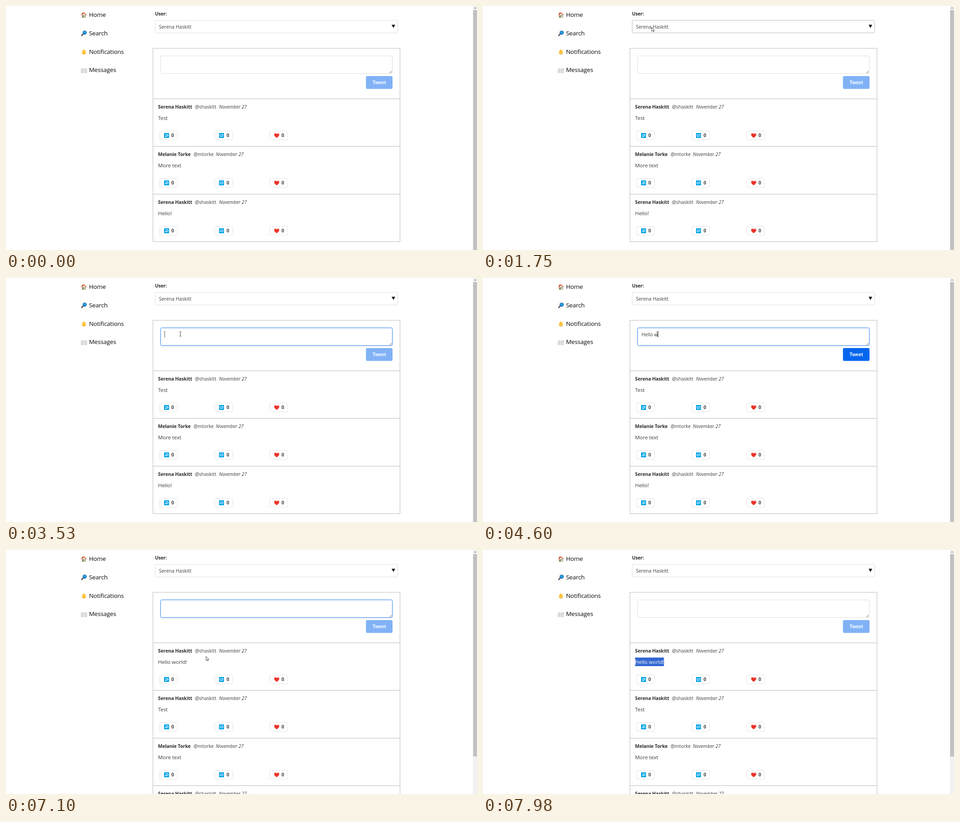
An HTML page for the animation above (8 s loop, 1037 by 540 pixels).

```html
<!DOCTYPE html>
<html lang="en">
<head>
<meta charset="utf-8">
<title>Message feed</title>
<style>
  html, body { margin: 0; width: 100%; height: 100%; overflow: hidden; background: #fff; }
  svg { display: block; width: 100vw; height: 100vh; }
  text { font: 10.4px "Open Sans", "Noto Sans", sans-serif; fill: #3d3d3d; white-space: pre; }
  .nav { font-size: 13.4px; letter-spacing: -.17px; fill: #0a0a0a; }
  .bold { font-size: 10.3px; font-weight: 700; fill: #2b2b2b; letter-spacing: -.04px; }
  .date { font-style: italic; }
  .choice { font-size: 10.6px; }
  .body { font-size: 11.5px; letter-spacing: -.06px; }
  .button { font: bold 10.7px "Liberation Sans", Arial, sans-serif; fill: #fff; }
  .count { font: bold 10.7px "Liberation Sans", Arial, sans-serif; fill: #363636; }
  .line { fill: none; stroke: #bbb; }
  .field { fill: #fff; stroke: #ddd; }
</style>
</head>
<body>
<svg id="stage" viewBox="0 0 1037 540" xmlns="http://www.w3.org/2000/svg">
  <defs>
    <g id="house">
      <path d="M2.2 2h2v4h-2z" fill="#a5422b"/>
      <path d="M2 6 6.5 2 11 6v6H2z" fill="#f1dfc4"/>
      <path d="M.3 7 6.5.8 12.7 7l-1 1-5.2-5-5.2 5z" fill="#d0502f"/>
      <path d="M3.3 7.7h2.5V12H3.3z" fill="#7a4b32"/>
      <path d="M7.3 7.7h2.4v2.2H7.3z" fill="#3a94c8"/>
      <path d="M1 11.5h11v1H1z" fill="#7d8f55"/>
    </g>
    <g id="lens">
      <path d="M1.6 11.4 5.4 7.6" stroke="#3b3f4c" stroke-width="2.4" stroke-linecap="round"/>
      <circle cx="8.2" cy="4.9" r="3.9" fill="#1b9be6" stroke="#265c8c" stroke-width="1.2"/>
      <path d="M6 4.6a2.3 2.3 0 0 1 2-2" fill="none" stroke="#8fd4fa"/>
    </g>
    <g id="bell">
      <circle cx="6.5" cy="10.8" r="1.3" fill="#d9981f"/>
      <circle cx="6.5" cy="1.6" r="1" fill="#eeb02d"/>
      <path d="M.8 10.6c1.7-1.4 1.7-3 1.9-5C2.9 3 4.4 1.5 6.5 1.5S10.1 3 10.3 5.6c.2 2 .2 3.6 1.9 5z" fill="#fdc33c"/>
    </g>
    <g id="mail">
      <path d="M.5.5h12v8.7H.5z" fill="#ececec" stroke="#bcbcbc" stroke-width=".8"/>
      <path d="M.7.8 6.5 5.6 12.3.8M.7 9 4.8 4.4M12.3 9 8.2 4.4" fill="none" stroke="#a8a8a8" stroke-width=".8"/>
    </g>
    <g id="reply">
      <rect width="11" height="11" rx="1" fill="#03a3e6"/>
      <path d="M3.2 3.2h3.4a1.9 1.9 0 0 1 0 3.8H4" fill="none" stroke="#fff" stroke-width="1.2"/>
      <path d="M2.2 7 5 4.8v4.4z" fill="#fff"/>
    </g>
    <g id="repeat">
      <rect width="11" height="11" rx="1" fill="#03a3e6"/>
      <rect x="2.2" y="3.6" width="6.6" height="3.8" rx="1" fill="none" stroke="#fff"/>
      <path d="M6.4 2.3v2.6l1.7-1.3zM4.6 6.1v2.6L2.9 7.4z" fill="#fff"/>
    </g>
    <g id="heart">
      <path d="M6 10.8C2.5 8.3.3 6.2.3 3.6.3.2 4.5-.3 6 2.5 7.5-.3 11.7.2 11.7 3.6 11.7 6.2 9.5 8.3 6 10.8z" fill="#ea3429"/>
      <path d="M8 2.3q1.5-.8 2 .9" fill="none" stroke="#ff8a80" stroke-width=".8"/>
    </g>
  </defs>
</svg>
<script>
const LOOP = 8000, SEND = 6030, FOCUS = 3530, BLUR = 7680;
const MESSAGE = "Hello world!";
const STRIKES = [3930, 4050, 4160, 4310, 4400, 4490, 4590, 4680, 4770, 4870, 5010, 5350];
const SERENA = ["Serena Haskitt", "@shaskitt", 416, 469];
const MELANIE = ["Melanie Torke", "@mtorke", 413, 462];

// Pointer keys: time, x, y
const POINTER = [
  [150, 991, 517], [420, 957, 402], [600, 971, 411], [810, 971, 411],
  [1520, 371.5, 47], [1750, 371.5, 47], [2000, 368, 58], [2430, 323.5, 43.5],
  [2550, 368, 51], [2640, 370, 52], [3100, 370, 52], [3480, 384, 124],
  [6930, 384, 124], [7100, 440.5, 235.5], [7260, 428, 253], [7600, 336, 249], [7680, 335, 248]
];

const stage = document.getElementById("stage");

function add(tag, attrs, parent = stage) {
  const el = document.createElementNS("http://www.w3.org/2000/svg", tag);
  for (const key in attrs) el.setAttribute(key, attrs[key]);
  parent.appendChild(el);
  return el;
}
function label(x, y, string, cls = "", parent = stage) {
  const el = add("text", { x, y, class: cls }, parent);
  el.textContent = string;
  return el;
}
function box(x, y, width, height, rx, attrs, parent) {
  return add("rect", { x, y, width, height, rx, ...attrs }, parent);
}
function icon(name, x, y, parent) {
  add("use", { href: "#" + name, x, y }, parent);
}
const show = (el, on) => el.setAttribute("visibility", on ? "visible" : "hidden");
const inside = (x, y, l, t, r, b) => x >= l && x <= r && y >= t && y <= b;
const slot = i => 205 + Math.round(105.4 * i);

// Navigation
[["house", "Home", 13], ["lens", "Search", 54], ["bell", "Notifications", 95.5], ["mail", "Messages", 138.5]]
  .forEach(([name, title, y], i) => {
    icon(name, 165, y);
    label(182.7, 23.7 + 40.9 * i, title, "nav");
  });

// User picker
label(328, 21, "User:", "bold");
const picker = box(328.5, 31.5, 534, 28, 3, { class: "field" });
label(336.8, 49.5, SERENA[0], "choice");
add("path", { d: "M849 41.5h8l-4 7z", fill: "#111" });

// Composer
const frame = box(323.5, 93.5, 544, 428, 0, { class: "line" });
const ring = box(339.5, 109.5, 512, 41, 4, { fill: "none", stroke: "#d3e5fb", "stroke-width": 1.5 });
const area = box(340.5, 110.5, 510, 39, 3, { class: "field" });
add("path", { d: "M844 148.5l5-5M847 148.5l2-2", stroke: "#444", "stroke-width": .8 });
const draft = label(349, 129, "");
const caret = add("path", { stroke: "#444", "stroke-width": .9 });
const send = box(792.5, 155, 58.5, 28.5, 3, {});
label(807, 173, "Tweet", "button");

// Feed
function makePost([name, handle, handleX, dateX], string) {
  const g = add("g", {});
  add("path", { d: "M323.5 .5h544", class: "line" }, g);
  label(334.8, 22, name, "bold", g);
  label(handleX, 22, handle, "", g);
  label(dateX, 22, "November 27", "date", g);
  const mark = box(334.8, 33, 0, 19, 0, { fill: "#3367d1" }, g);
  const body = label(334.8, 47, string, "body", g);
  [["reply", 338.5, 348], ["repeat", 460, 469], ["heart", 581, 590]].forEach(([kind, x, iconX]) => {
    box(x, 71.5, 39, 19.5, 2.5, { fill: "#fff", stroke: "#e4e4e4" }, g);
    icon(kind, iconX, 76, g);
    label(x + 25.5, 85.2, "0", "count", g);
  });
  return { g, mark, body };
}
const fresh = makePost(SERENA, MESSAGE);
const older = [[SERENA, "Test"], [MELANIE, "More text"], [SERENA, "Hello!"]].map(p => makePost(...p));
const place = (post, i) => post.g.setAttribute("transform", `translate(0 ${slot(i)})`);
place(fresh, 0);

// Scrollbar
add("path", { d: "M1028 0h9v540h-9z", fill: "#f1f1f1" });
add("path", { d: "M1030.3 5.5h5l-2.5-3z", fill: "#8a8a8a" });
const thumb = box(1028.5, 9, 8.5, 531, 0, { fill: "#c1c1c1" });

// Pointers
const arrow = add("path", {
  d: "M0 0V9L2.1 7.2 3.5 10.2 4.9 9.6 3.5 6.6H6.2Z",
  fill: "#fff", stroke: "#222", "stroke-width": .8
});
const beam = add("path", {
  d: "M-2.2-4.7h1.6L0-4.2l.6-.5h1.6M0-4.2v8.4M-2.2 4.7h1.6L0 4.2l.6.5h1.6",
  fill: "none", "stroke-width": .9
});

function pointerAt(t) {
  const next = POINTER.findIndex(k => k[0] > t);
  if (next < 0) return POINTER[POINTER.length - 1].slice(1);
  const [t0, x0, y0] = POINTER[Math.max(0, next - 1)], [t1, x1, y1] = POINTER[next];
  const p = Math.max(0, Math.min(1, (t - t0) / (t1 - t0 || 1)));
  const e = p * p * (3 - 2 * p);
  return [x0 + (x1 - x0) * e, y0 + (y1 - y0) * e];
}

function render(t) {
  const sent = t >= SEND, focused = t >= FOCUS && t < BLUR;
  const typed = sent ? 0 : STRIKES.filter(s => s <= t).length;

  draft.textContent = MESSAGE.slice(0, typed);
  const end = 349.5 + (typed ? draft.getComputedTextLength() : 0);
  caret.setAttribute("d", `M${end} 117v14.5`);
  show(caret, focused && (t < 5960 || (sent && t < 6490)));
  show(ring, focused);
  area.style.stroke = focused ? "#4a93f0" : "#ddd";
  send.setAttribute("fill", typed ? "#0366ee" : "#81b2f6");

  show(fresh.g, sent);
  older.forEach((post, i) => place(post, i + sent));
  frame.setAttribute("height", slot(3 + sent) - 93);
  thumb.setAttribute("height", sent ? 448 : 531);

  const picked = t >= 7980 ? MESSAGE.length : t >= 7820 ? 5 : 0;
  const width = picked ? fresh.body.getSubStringLength(0, picked) : 0;
  fresh.mark.setAttribute("width", width);
  fresh.body.textContent = "";
  for (const [part, fill] of [[MESSAGE.slice(0, picked), "#fff"], [MESSAGE.slice(picked), "#3d3d3d"]])
    if (part) add("tspan", { style: `fill:${fill}` }, fresh.body).textContent = part;

  const [x, y] = pointerAt(t);
  const overText = inside(x, y, 340, 110, 851, 150) || (sent && inside(x, y, 334, 238, 399, 257));
  show(arrow, t >= 150 && !overText);
  show(beam, t >= 150 && overText);
  arrow.setAttribute("transform", `translate(${x} ${y})`);
  beam.setAttribute("transform", `translate(${x} ${y})`);
  beam.setAttribute("stroke", picked ? "#fff" : "#333");
  picker.style.stroke = t >= 150 && inside(x, y, 328, 31, 863, 59) ? "#b9b9b9" : "#ddd";
}

const start = performance.now();
function tick(now) {
  render(Math.max(0, now - start) % LOOP);
  requestAnimationFrame(tick);
}
render(0);
requestAnimationFrame(tick);
</script>
</body>
</html>
```
